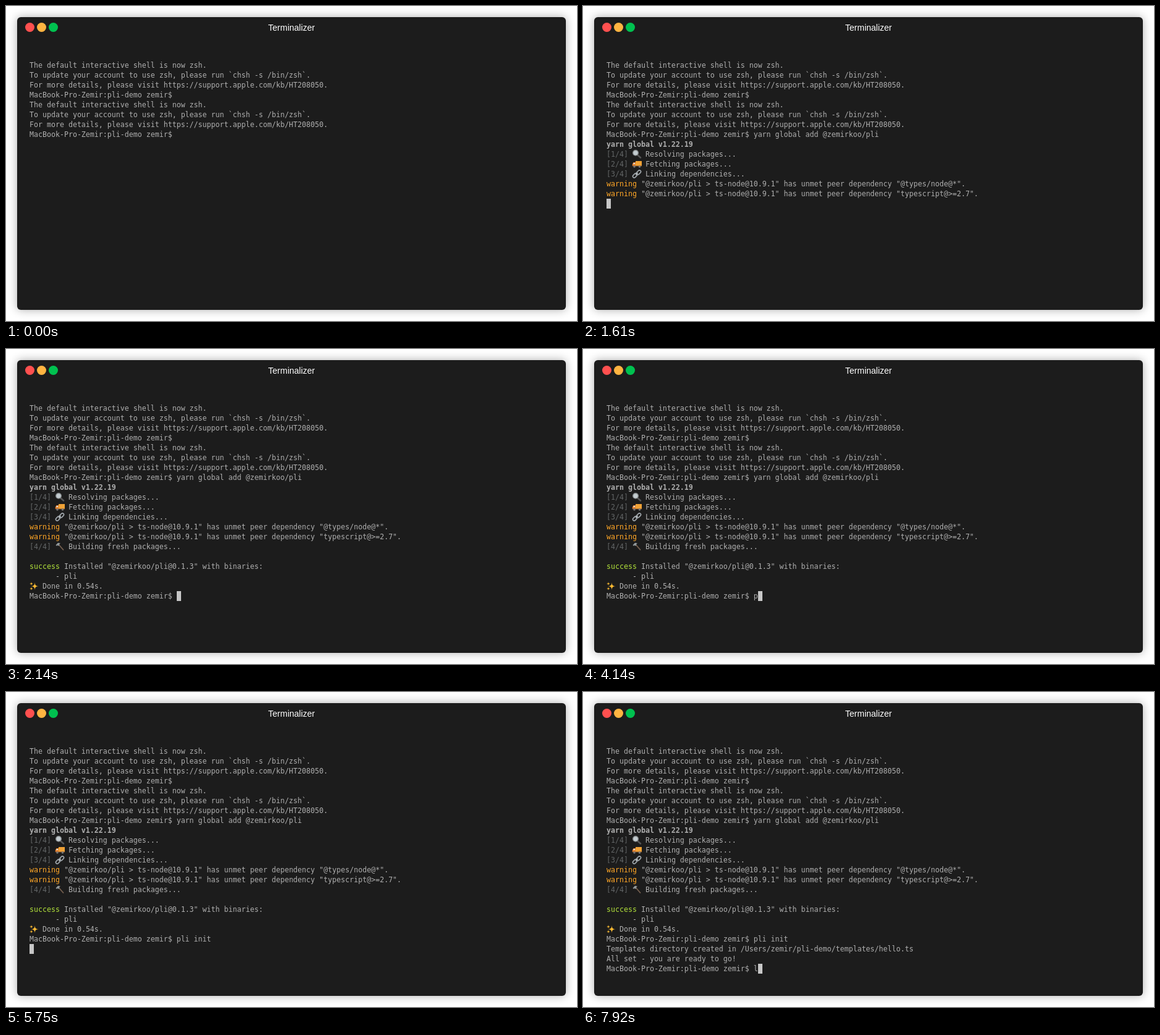
Animation of 923 by 510 pixels, one loop 8000 ms. Source, as an HTML page:

```html
<!DOCTYPE html>
<html lang="en">
<head>
<meta charset="utf-8">
<title>Terminal</title>
<style>
html, body { margin: 0; width: 100%; height: 100%; overflow: hidden; background: #fff; }
#window {
  position: absolute; left: 18px; top: 18px; width: 887px; height: 474px;
  border-radius: 6px; background: #1c1c1c; box-shadow: 0 0 15px rgba(0, 0, 0, .32);
}
#title {
  position: absolute; left: 0; right: 0; top: 9px; text-align: center;
  font: 14px/16px "Liberation Sans", Arial, sans-serif; color: #fff;
}
.light { position: absolute; top: 9px; width: 15px; height: 15px; border-radius: 50%; }
#screen {
  position: absolute; left: 20px; top: 70px; margin: 0; color: #afafaf;
  font: 11.627px/16px "DejaVu Sans Mono", monospace; font-variant-ligatures: none;
}
#screen div { height: 16px; white-space: pre; }
#screen i { display: inline-block; width: 7px; height: 16px; vertical-align: top; background: #c7c7c7; }
#screen svg { width: 16px; height: 16px; margin: 0 -1px; vertical-align: top; }
.dim { color: #626566; }
.warn { color: #ffa727; }
.ok { color: #b3e33b; }
</style>
</head>
<body>
<div id="window">
  <div class="light" style="left:13px;background:#ff504f"></div>
  <div class="light" style="left:32px;background:#ffb441"></div>
  <div class="light" style="left:51px;background:#00c14f"></div>
  <div id="title">Terminalizer</div>
  <pre id="screen"></pre>
</div>
<script>
const LOOP = 8000;
const screenEl = document.getElementById('screen');

const tag = (cls, text) => `<span class="${cls}">${text}</span>`;
const icon = shapes => `<svg viewBox="0 0 16 16" fill="none">${shapes}</svg>`;

const lens = icon(`<path d="M9.5 9.5L14 13.5" stroke="#555" stroke-width="2.6" stroke-linecap="round"/>
  <circle cx="6" cy="5.8" r="4.3" fill="#c3ccd0" stroke="#85898b" stroke-width="1.4"/>`);
const truck = icon(`<path d="M6 3h10v8H6z" fill="#f0a236"/><path d="M2.5 5H6v6H.8V8z" fill="#e8802c"/>
  <path d="M3 6h2v2H2z" fill="#cfe2e8"/><path d="M.8 11H16" stroke="#8a5a35"/>
  <circle cx="4" cy="12" r="1.8" fill="#777"/><circle cx="12.5" cy="12" r="1.8" fill="#777"/>`);
const chain = icon(`<g stroke="#a4abb0" stroke-width="1.6">
  <rect x="7" y="3.2" width="8" height="4.6" rx="2.3" transform="rotate(-45 11 5.5)"/>
  <rect x="1" y="8.2" width="8" height="4.6" rx="2.3" transform="rotate(-45 5 10.5)"/></g>
  <path d="M6.3 9.4L9.6 6.2" stroke="#c6cbce" stroke-width="1.4"/>`);
const hammer = icon(`<path d="M6.5 5L13.5 13" stroke="#76604f" stroke-width="1.8" stroke-linecap="round"/>
  <path d="M1.5 5.5L5 1.8 9 2.4 7 4.2 7.6 5.4 5.6 7 4.4 5.6 3 7z" fill="#92989b"/>`);
const star = (x, y, r) => `<path fill="#f8b932" d="M${x} ${y - r}Q${x} ${y} ${x + r} ${y}Q${x} ${y} ${x} ${y + r}Q${x} ${y} ${x - r} ${y}Q${x} ${y} ${x} ${y - r}"/>`;
const sparkles = icon(star(9.5, 8, 6) + star(4, 4, 3.2) + star(4, 12, 3));

const prompt = 'MacBook-Pro-Zemir:pli-demo zemir$ ';
const intro = `The default interactive shell is now zsh.
To update your account to use zsh, please run \`chsh -s /bin/zsh\`.
For more details, please visit https://support.apple.com/kb/HT208050.
${prompt}`;
const step = (n, pic, text) => `${tag('dim', `[${n}/4]`)} ${pic} ${text}...\n`;
const warning = dep => `${tag('warn', 'warning')} "@zemirkoo/pli &gt; ts-node@10.9.1" has unmet peer dependency "${dep}".\n`;
const bar = (done, total) => `[${'#'.repeat(done)}${'-'.repeat(total - done)}] ${done}/${total}`;
const typing = (row, text, times) => times.map((t, i) => [t, row, prompt + text.slice(0, i + 1)]);

// [time, first row replaced, new text, cursor hidden]
const events = [
  [0, 0, intro + '\n' + intro, true],
  [500, 7, prompt + 'yarn global add @zemirkoo/pli'],
  [1170, 8, ''],
  [1340, 8, '<b>yarn global v1.22.19</b>\n'],
  [1390, 9, step(1, lens, 'Resolving packages')],
  [1440, 10, step(2, truck, 'Fetching packages')],
  [1480, 11, bar(0, 85), true],
  [1540, 11, step(3, chain, 'Linking dependencies')],
  [1610, 12, warning('@types/node@*') + warning('typescript@&gt;=2.7')],
  [1630, 14, bar(0, 85), true],
  [1840, 14, bar(43, 85)],
  [1940, 14, step(4, hammer, 'Building fresh packages')],
  [2060, 15, `\n${tag('ok', 'success')} Installed "@zemirkoo/pli@0.1.3" with binaries:\n      - pli\n${sparkles} Done in 0.54s.\n`],
  [2140, 19, prompt],
  ...typing(19, 'pli init', [4140, 4390, 4540, 4700, 4930, 5150, 5250, 5440]),
  [5750, 20, ''],
  [6190, 20, 'Templates directory created in /Users/zemir/pli-demo/templates/hello.ts\nAll set - you are ready to go!\n'],
  [6290, 22, prompt],
  ...typing(22, 'l', [7920])
].map(([time, row, text, hidden]) => ({
  time, row, hidden,
  // line breaks inside icons are not rows
  rows: text.replace(/<svg[^]*?<\/svg>/g, s => s.replace(/\n\s*/g, '')).split('\n')
}));

let shown = -1;
function draw(now) {
  const t = now % LOOP;
  const past = events.filter(e => e.time <= t);
  if (past.length !== shown) {
    shown = past.length;
    const lines = [];
    for (const e of past) lines.splice(e.row, lines.length, ...e.rows);
    if (!past[shown - 1].hidden) lines[lines.length - 1] += '<i></i>';
    screenEl.innerHTML = lines.map(l => `<div>${l}</div>`).join('');
  }
  requestAnimationFrame(() => draw(performance.now()));
}
draw(performance.now());
</script>
</body>
</html>
```
